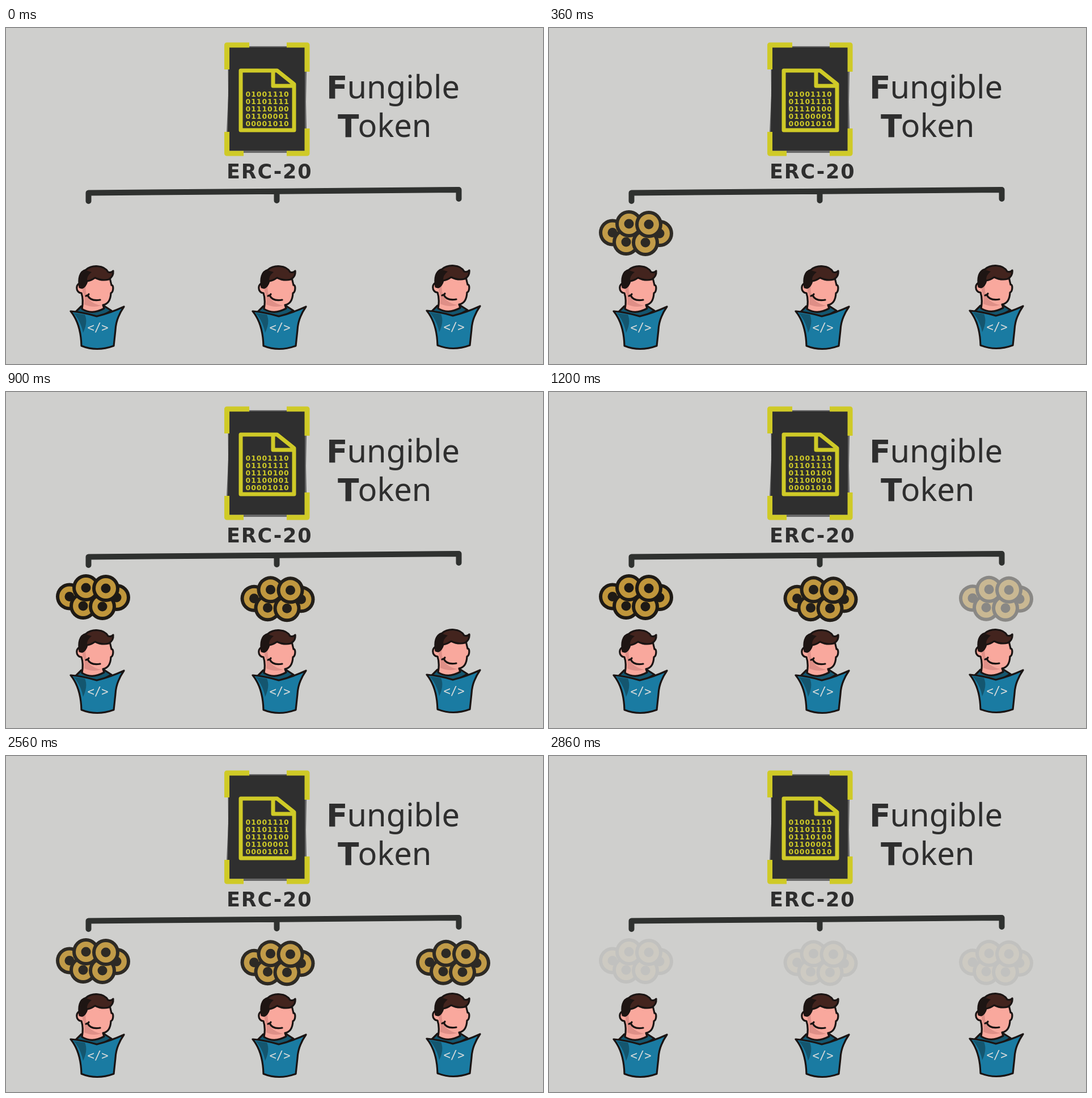
Write an HTML page that moves like this. It is 947x592 px and loops after 3 s.

```html
<!DOCTYPE html>
<html lang="en">
<head>
<meta charset="utf-8">
<title>Fungible Token</title>
<style>
html, body { margin: 0; width: 100%; height: 100%; overflow: hidden; background: #cfcfcd; }
svg { display: block; width: 947px; height: 592px; }
.bold { font-family: "DejaVu Sans", sans-serif; font-weight: bold; }
.title { font-size: 56px; font-family: "Noto Sans", sans-serif; fill: #2e2e2e; }
.title .bold { font-size: 55px; font-family: "DejaVu Sans", sans-serif; }
.bits { font-size: 12.5px; letter-spacing: .95px; fill: #cfca27; }
.code { font: 20.5px "DejaVu Sans Mono", monospace; fill: #d9dcdb; }
.yellow { fill: none; stroke: #cfca27; stroke-linejoin: round; }
.ink { stroke: #1a1413; stroke-width: 3.2; stroke-linejoin: round; stroke-linecap: round; }
</style>
</head>
<body>
<svg viewBox="0 0 947 592">
  <defs>
    <g id="person">
      <path class="ink" fill="#14566f" d="M122 501L133 490L172 489L186 498L160 512Z"/>
      <!-- head and neck -->
      <path class="ink" fill="#f9a89d" d="M133 450C122 448 122 467 133 467Q137 479 134 495Q152 506 173 494L171 488Q184 486 185 467C190 465 190 452 186 453L182 436L146 434Z"/>
      <path fill="#df8f87" d="M135 460L141 451Q138 468 148 480Q158 488 168 489Q153 494 138 487Q140 475 135 464Z"/>
      <path class="ink" fill="none" stroke-width="2.4" d="M141 472Q145 471 146 469M144 471Q149 482 166 479"/>
      <!-- hair -->
      <path class="ink" fill="#43241e" d="M130 457C127 441 130 429 141 426C151 417 173 417 180 430Q185 432 189 428Q190 438 181 443Q169 446 157 440Q150 445 143 446Q140 456 134 458Z"/>
      <path fill="#1e1513" d="M130 457C127 441 130 429 141 427L151 430Q142 437 143 446Q140 456 134 458Z"/>
      <!-- shirt -->
      <path class="ink" fill="#1a7ba2" d="M114 499Q137 501 160 508Q184 502 208 491Q194 511 193 532L190 560Q160 571 133 560Q132 521 114 499Z"/>
      <path fill="#14566f" d="M119 502L139 505Q145 518 136 537Q132 516 119 502Z"/>
      <text class="code" x="143.5" y="535">&lt;/&gt;</text>
    </g>
    <g id="coins"></g>
  </defs>

  <!-- contract card -->
  <path fill="#686868" d="M391 32H531L529 130L531 220H390L389 182L392 120Z"/>
  <path fill="#2f2f2f" d="M393 34H527V216H393L391 184Z"/>
  <path class="yellow" stroke-width="9" d="M389.500 73V30H429M495 30H531V77M389.500 183V221H419M495 221H531V177"/>
  <path class="yellow" stroke-width="7" d="M414 75H478L508 99V180H414ZM471 77V102H507"/>
  <g id="bits" class="bold bits"></g>

  <g class="title">
    <text class="bold" x="565" y="124">F</text><text x="601.500" y="124">ungible</text>
    <text class="bold" x="585" y="192">T</text><text x="620.500" y="192">oken</text>
  </g>
  <text class="bold" x="389" y="265" font-size="35" letter-spacing="1.8" fill="#2e2e2e">ERC-20</text>

  <path fill="none" stroke="#2f312f" stroke-width="10" stroke-linecap="round" stroke-linejoin="round"
    d="M145.500 305V290.500L798.500 285V301M477.500 288V304"/>

  <use href="#person"/>
  <use href="#person" x="321"/>
  <use href="#person" x="628" y="-1"/>
  <use class="pile" href="#coins"/>
  <use class="pile" href="#coins" x="325.500" y="3.300"/>
  <use class="pile" href="#coins" x="635" y="2.800"/>
</svg>
<script>
const LOOP = 3000;
const $ = id => document.getElementById(id);

const centers = [[112, 360.5], [195, 362], [136, 377], [170, 378], [141, 345], [176, 346]];
$("coins").innerHTML = centers.map(([x, y]) =>
  `<g transform="translate(${x} ${y})"><circle r="24" fill="#1e1a15"/>` +
  `<circle r="18" fill="#c0963b"/><circle r="8.500" fill="#1e1a15"/></g>`).join("");

const words = ["01001110", "01101111", "01110100", "01100001", "00001010"];
$("bits").innerHTML = words.map((word, i) =>
  `<text x="422.500" y="${121.3 + i * 12.8}">${word}</text>`).join("");

// Fades run on ticks of 1/30 s: [tick before start, ticks to full, final opacity]
const fades = [[3, 8.8, 1], [17, 10.3, 0.97], [32, 10.3, 0.97]];
const FADE_OUT = 77;
const piles = document.querySelectorAll(".pile");
const clamp = (v, max) => Math.max(0, Math.min(max, v));

function opacity([start, length, max], tick) {
  if (tick >= FADE_OUT) return 0.91 - 0.84 * clamp((tick - FADE_OUT) / 9, 1);
  return clamp((tick - start) / length, max);
}

function draw() {
  const t = performance.now() % LOOP;
  const tick = Math.floor((t + 6.7) * 0.03);
  piles.forEach((pile, i) => pile.setAttribute("opacity", opacity(fades[i], tick)));
  requestAnimationFrame(draw);
}
draw();
</script>
</body>
</html>
```
